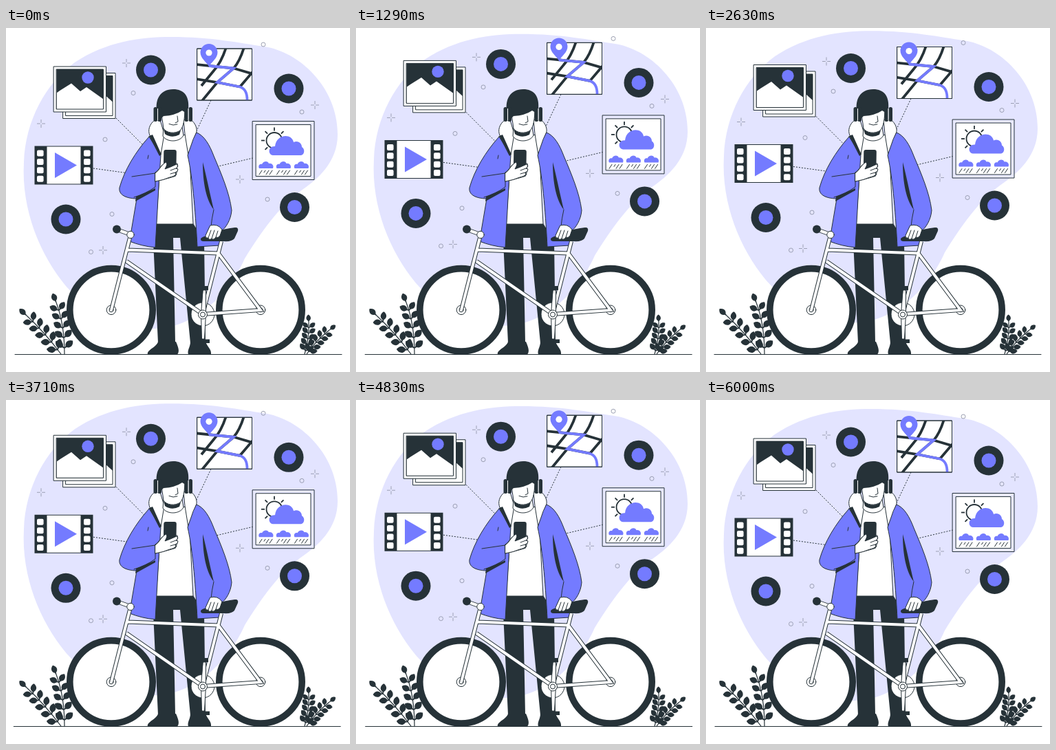
Write an HTML page that moves like this. It is 500 by 500 pixels and loops after 6040 ms.

```html
<!DOCTYPE html>
<html lang="en">
<head>
<meta charset="utf-8">
<title>Cyclist with phone</title>
<style>
  html, body { margin: 0; width: 100%; height: 100%; overflow: hidden; background: #fff; }
  svg { display: block; width: 100%; height: 100%; }
  .d { fill: #263238; }
  .p { fill: #747bff; }
  .w { fill: #fff; }
  .o { stroke: #263238; stroke-width: 1; stroke-linejoin: round; stroke-linecap: round; }
  .n { fill: none; }
</style>
</head>
<body>
<svg viewBox="0 0 500 500">
  <defs>
    <path id="tubes" d="M181 301L153 410M177 322.5L309 327.500M175 339L286 416M313 310L286 416M309 328L370 410L286 416M164 294L181 300"/>
    <path id="cloud" d="M-10 5C-12 1-9-2-6-1C-4-6 3-6 4-2C8-3 12 1 10 5Z"/>
    <g id="rain">
      <use href="#cloud" class="p"/>
      <path class="n o" d="M-6 8l-4 6M-1 8l-2 3M4 8l-4 6M9 8l-4 6"/>
    </g>
    <clipPath id="mapArea"><path d="M278 30h79.500v75h-79.500z"/></clipPath>
  </defs>

  <path id="blob" fill="#e3e4ff" d="M26 195C28 135 58 80 100 50C145 20 195 13 240 13C300 13 340 22 375 27C425 34 482 85 482 155C482 195 453 220 428 237C398 258 370 298 347 335C325 385 275 437 215 437C150 437 105 395 87 375C50 330 22 265 26 195Z"/>

  <g id="float">
    <g id="specks" fill="none" stroke="#9498ab" stroke-width=".9"></g>
    <path class="n" stroke="#263238" stroke-dasharray="2 2" d="M160 131L210 181M298 105L272 160M363 188L300 203M127 204L185 212"/>

    <!-- photos -->
    <path class="w o" d="M83 65.500h76v66h-76z"/>
    <path class="w o" d="M87 69.500h68v58h-68z"/>
    <path class="d" d="M140 69.500h15v38l-10-9h-5z"/>
    <path class="w o" d="M69.500 56h76v66h-76z"/>
    <path class="d o" d="M73.500 60h68v58h-68z"/>
    <path class="w" d="M74 94L79 90.500L95 80.500L108 92L117 86L141 103V117.500H74Z"/>
    <circle class="p" cx="119" cy="72" r="8.700"/>

    <!-- film strip -->
    <path class="d" d="M41.500 171.500h85v56h-85z"/>
    <path class="w" d="M59.500 172.500h49v54h-49z"/>
    <path class="p" d="M71 181L103 199.500L71 218Z"/>
    <g id="holes" class="w"></g>

    <!-- map -->
    <path class="w o" d="M278 30h79.500v75h-79.500z"/>
    <g class="n" clip-path="url(#mapArea)" stroke="#263238" stroke-width="3.800">
      <path d="M276 53L331 58.500L360 67M346 28Q340 48 331 58.500L307 79L284 107M276 74L307 79L340 85.500M320 28Q313 50 302 62L284 84M360 62L340 85.500"/>
      <path stroke="#747bff" d="M295 55L331 58.500L307 79L340 85.500Q351 89 350.500 106"/>
    </g>
    <path class="n o" d="M278 30h79.500v75h-79.500z"/>
    <path class="p" d="M295 56C291 49 282.500 44 282.500 35.500A12.500 12.500 0 0 1 307.500 35.500C307.500 44 299 49 295 56Z"/>
    <circle class="w" cx="295" cy="36" r="4.600"/>

    <!-- weather -->
    <path class="o" fill="#e8e9ff" d="M358.500 135.500h89.500v85h-89.500z"/>
    <path class="w o" d="M363.500 140.500h79.500v75h-79.500z"/>
    <g id="sun" class="n" stroke="#263238" stroke-width="1.800" transform="translate(390 163.500)"><circle r="11.500"/></g>
    <path class="p" d="M388 185C380 184 381 171 391 172C393 153 416 153 418 166C425 163 430 168 430 173C435 176 434 184 429 185Z"/>
    <use href="#rain" x="378" y="199"/>
    <use href="#rain" x="403.500" y="199"/>
    <use href="#rain" x="429.500" y="199"/>

    <g id="badges"></g>
  </g>

  <path id="ground" class="o" d="M13 474.500H488"/>
  <g id="plants" class="d" stroke="#263238" stroke-width="1.200"></g>

  <!-- trousers and shoes -->
  <path class="d" d="M218 284H272L288 310L290 458H268L253 305H243L246 458H221L214 310Z"/>
  <path class="d" d="M221 456H247C250 463 253 470 249 474.500H206C204 468 219 464 221 456ZM268 456H290C293 464 299 467 298 474.500H265C263 468 268 464 268 456Z"/>

  <!-- shirt, hood and neck -->
  <path class="w o" d="M226 158L264 155L267 190L272 285H218L222 230L224 180Z"/>
  <path class="w o" d="M216 134C208 140 206 149 209 156L225 184L230 154L224 134ZM268 133C276 138 279 148 276 154L265 185L260 154L258 134Z"/>
  <path class="w o" d="M229 145L228 157C233 166 252 167 258 156L256 144Z"/>

  <!-- coat -->
  <path class="p o" d="M208 158L225 185L222 230L217 319Q197 317 179.500 310L190 248C180 248 163 245 165 232C172 207 188 180 208 158Z"/>
  <path class="d" d="M208 157L213 155L226 184L223 186ZM189 245L217 233V236L188 252Z"/>
  <path class="n o" d="M183 216L217 211V231Q203 241 186 246M207 185L206 190"/>
  <path class="p o" d="M277 152C288 156 296 170 302 186C313 212 325 240 328 265C327 279 319 291 314 294L310 316L278 318C276 278 272 220 264 185L272 162Z"/>
  <path class="d" d="M286 195C292 218 297 244 302 264C291 250 286 225 286 195Z"/>
  <path class="n o" d="M302 264Q299 277 298 289"/>

  <!-- head -->
  <path class="w o" d="M225 118L229 146C233 153 246 154 253 149C258 144 260 132 260 116Z"/>
  <path class="d" d="M229 147Q241 157 254 149L252 155Q241 161 231 154Z"/>
  <path class="d" d="M220 127C215 104 224 89 243 89C259 89 267 99 265 119L261 123L256 120Q246 127 229 128L225 132Z"/>
  <path class="n o" d="M249 128L250 136L246 138M237 139.500Q243 142.500 249 140"/>
  <g class="d">
    <rect x="214.500" y="115" width="5.500" height="21" rx="2.500"/>
    <rect x="220.500" y="115" width="5.500" height="21" rx="2"/>
    <rect x="259.500" y="115" width="5.500" height="21" rx="2"/>
    <rect x="265.500" y="115" width="5.500" height="21" rx="2.500"/>
  </g>
  <path class="n" stroke="#fff" d="M220.500 117v17M265 117v17"/>

  <!-- phone hand -->
  <path class="w o" d="M217 210C223 207 224 200 230 197L249 197Q251 201 248 204Q251 207 248 210Q249 214 244 216C234 219 226 221 217 223Z"/>
  <rect class="d" x="229" y="177" width="18.500" height="39" rx="3" transform="rotate(1 238 197)"/>
  <path class="w o" d="M217 211C222 208 225 200 232 195Q235 196 233 201L231 205L239 202L248 198Q251 201 247 204L250 205Q250 209 246 210L247 213Q244 216 238 217Q229 221 217 223Z"/>
  <path class="n o" d="M239 207L247 204M239 212L246 210"/>

  <!-- bicycle -->
  <g id="wheels"></g>
  <circle class="w o" cx="286" cy="416" r="17"/>
  <use href="#tubes" class="n" stroke="#263238" stroke-width="6"/>
  <use href="#tubes" class="n" stroke="#fff" stroke-width="4"/>
  <circle class="w o" cx="181" cy="300.500" r="5.200"/>
  <circle class="d" cx="161" cy="292.500" r="6"/>
  <path class="w o" d="M286.500 381h4v34l-2 37h-4l-1-36z"/>
  <path class="d" d="M284 375h10v6h-10zM283 452.500h13v5.500h-13z"/>
  <circle class="w o" cx="286" cy="416.500" r="6.500"/>
  <circle class="w o" cx="286" cy="416.500" r="3.500"/>
  <path class="d" d="M283 307C284 302 297 302 306 297C315 292 329 290 335 290Q338 291 337 295L332 306Q328 311 316 310H287Q283 310 283 307Z"/>
  <path class="w o" d="M297 287Q308 284 314 293L311 302Q308 306 305 304Q302 309 299 306Q295 309 294 305Q290 306 290 302Z"/>
  <path class="n o" d="M298 294L294 305M303 294L299 306M308 295L305 304"/>
</svg>
<script>
const el = id => document.getElementById(id);
const fill = (id, list, draw) => { el(id).innerHTML = list.map(draw).join(''); };

const crosses = [[175, 51], [51, 139], [449, 112], [340, 220], [141, 323]];
const rings = [[374, 24], [185, 94.5], [144, 162], [430, 122], [380, 249], [154, 270.5], [123.5, 325.5]];
fill('specks', [...crosses, ...rings], ([x, y], i) => i < crosses.length
  ? `<path d="M${x - 6} ${y}h4.800m2.400 0h4.800M${x} ${y - 6}v4.800m0 2.400v4.800"/>`
  : `<circle cx="${x}" cy="${y}" r="3"/>`);

fill('holes', [0, 1, 2, 3, 4, 5, 6, 7], i =>
  `<rect x="${i < 4 ? 45 : 113}" y="${177.5 + i % 4 * 12.4}" width="9.600" height="9" rx="2"/>`);

el('sun').innerHTML += [0, 1, 2, 3, 4, 5, 6, 7].map(i =>
  `<path d="M14 0h5" transform="rotate(${i * 45})"/>`).join('');

fill('badges', [[210.5, 61], [411, 88], [87, 278], [419.5, 260.5]], ([x, y]) =>
  `<circle class="d" cx="${x}" cy="${y}" r="21.500"/><circle class="p" cx="${x}" cy="${y}" r="10.500"/>`);

fill('wheels', [153, 370], x =>
  `<circle cx="${x}" cy="409.800" r="60.200" fill="#fff" stroke="#263238" stroke-width="9.600"/>
   <circle class="w o" cx="${x}" cy="409.800" r="6.800"/><circle class="w o" cx="${x}" cy="409.800" r="3"/>`);

// A curved stem with pairs of leaves that shrink towards the tip.
function plant([x0, y0, cx, cy, x1, y1, size, pairs]) {
  const leaf = (x, y, angle, s) =>
    `<path stroke="none" transform="translate(${x} ${y}) rotate(${angle}) scale(${s})" d="M0 .6L3 1C6 6 12 5 15 0C12-5 6-6 3-1L0-.6Z"/>`;
  let out = `<path fill="none" d="M${x0} ${y0}Q${cx} ${cy} ${x1} ${y1}"/>`;
  for (let i = 0; i <= pairs; i++) {
    const u = .1 + .9 * i / pairs, v = 1 - u;
    const x = v * v * x0 + 2 * u * v * cx + u * u * x1;
    const y = v * v * y0 + 2 * u * v * cy + u * u * y1;
    const a = Math.atan2(v * (cy - y0) + u * (y1 - cy), v * (cx - x0) + u * (x1 - cx)) * 180 / Math.PI;
    const s = size * (1.1 - .15 * u);
    out += i < pairs ? leaf(x, y, a - 50, s) + leaf(x, y, a + 50, s) : leaf(x, y, a, s);
  }
  return out;
}
fill('plants', [
  [85, 474, 85, 430, 73, 399, 1, 5],
  [80, 474, 56, 442, 30, 418, 1, 5],
  [434, 474, 441, 450, 440, 428, .8, 5],
  [437, 474, 450, 455, 470, 439, .8, 5]
], plant);

const shake = [0, -1, 2, -4, 4, -4, 4, -4, 2, -1, 0];
const bob = (t, period) => -10 * (1 - Math.abs(1 - 2 * (t % period) / period));
const move = (id, x, y) => el(id).setAttribute('transform', `translate(${x} ${y})`);
const start = performance.now();

function tick() {
  // Motion advances in steps of 1/24 s.
  const step = Math.floor(((performance.now() - start) % 6040 + 4) * .024);
  const t = step * 1000 / 24;
  const k = step % 36 / 3.6, i = Math.floor(k);
  move('float', 0, bob(t, 3000));
  move('blob', 0, bob(t, 6000));
  move('ground', shake[i] + (shake[i + 1] - shake[i]) * (k - i), 0);
  requestAnimationFrame(tick);
}
tick();
</script>
</body>
</html>
```
